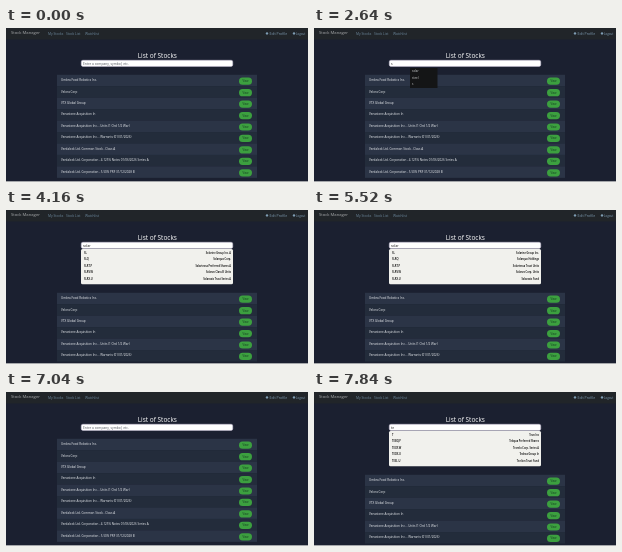
An HTML page that plays this animation: 302x154 px, repeating every 8 s.

```html
<!DOCTYPE html>
<html lang="en">
<head>
<meta charset="utf-8">
<title>List of stocks</title>
<style>
html, body { margin: 0; width: 100%; height: 100%; overflow: hidden; background: #1b2030; }
svg { display: block; width: 302px; height: 154px; }
text { font: 3.3px "Open Sans", sans-serif; white-space: pre; }
</style>
</head>
<body>
<svg id="stage" viewBox="0 0 302 154"></svg>
<script>
const stage = document.getElementById('stage');
const LOOP = 8000;

const stocks = [
  'Umbra Food Robotics Inc.', 'Velora Corp', 'VTX Global Group', 'Venastone Acquisition In',
  'Venastone Acquisition Inc. - Units (1 Ord 1/2 War)',
  'Venastone Acquisition Inc. - Warrants (01/01/2026)',
  'Verdalock Ltd. Common Stock - Class A',
  'Verdalock Ltd. Corporation - 4.125% Notes 01/06/2026 Series A',
  'Verdalock Ltd. Corporation - 5.50% PRF 31/12/2028 B'
];

const hints = ['solar', 'steel', 's', 'metals', 'tin', 'bank'];

// Each result is "symbol|company".
const results = {
  first: ['SLR|Solarine Holdings', 'SOLQ|Solquest Corp.', 'SOLT.P|Soltessa Preferred A', 'SOLV.W|Solvaro Warrants', 'SOLX.U|Solaxis Trust Units'],
  solar: ['SL|Solarine Group Inc. A', 'SLQ|Solarquo Corp.', 'SLRT.P|Solartessa Preferred Shares A', 'SLRV.W|Solarvo Class B Units', 'SLRX.U|Solaraxis Trust Series A'],
  more: ['SL|Solarine Group Inc.', 'SLRQ|Solarquo Holdings', 'SLRT.P|Solartessa Trust Units', 'SLRV.W|Solarvo Corp. Units', 'SLRX.U|Solaraxis Fund'],
  s: ['SABR.|Sabrel Group Inc. Uni', 'SCOR|Scorvane Corp. Uni', 'SDRL.|Sedrallo Grp. Units A', 'SELM|Selmora Trust A', 'SERQ.|Serqua Partners'],
  t: ['T|Tavo Inc.', 'TABQ|Tabqua Holdings Inc.', 'TACR|Tacrelo Corp.', 'TADX|Tadexa Group', 'TAEL|Taelion Trust A'],
  te: ['T|Tevo Inc', 'TEBQ.P|Tebqua Preferred Shares', 'TECR.W|Tecrelo Corp. Series A', 'TEDX.U|Tedexa Group In', 'TEEL.U|Teelion Trust Fund']
};

// Start time, typed text, number of hints, result set, hint opacity.
const states = [
  [0, '', 0],
  [720, '', 6, null, .6],
  [800, '', 6],
  [2640, 's', 3],
  [3280, 'so', 0],
  [3440, 'sol', 0],
  [3760, 'sola', 0],
  [3920, 'solar', 0, 'first'],
  [4160, 'solar', 0, 'solar'],
  [4320, 'solar', 0, 'more'],
  [4720, 'solar', 0, 'solar'],
  [5200, 'solar', 0, 'more'],
  [6000, 'sol', 0, 'more'],
  [6080, 'so', 0, 'more'],
  [6160, 's', 3, 'more'],
  [6320, 's', 3, 's'],
  [6560, '', 0],
  [7520, 't', 0, 't'],
  [7760, 'te', 0, 'te']
];

const rect = (x, y, w, h, fill, r = 0, extra = '') =>
  `<rect x="${x}" y="${y}" width="${w}" height="${h}" rx="${r}" fill="${fill}" ${extra}/>`;
const text = (x, y, s, fill, size = 3.3, anchor = 'start', weight = 400) =>
  `<text x="${x}" y="${y}" fill="${fill}" text-anchor="${anchor}" style="font-size:${size}px;font-weight:${weight}">${s}</text>`;

function header() {
  return rect(0, 0, 302, 11.5, '#212529') +
    text(5, 6.2, 'Stock Manager', '#a9abad', 4.2) +
    text(42, 6.5, 'My Stocks', '#6f8ba0') +
    text(60, 6.5, 'Stock List', '#6f8ba0') +
    text(79, 6.5, 'Watchlist', '#6f8ba0') +
    `<circle cx="261" cy="5.4" r="1.2" fill="#7f9db3"/>` +
    text(263.5, 6.5, 'Edit Profile', '#7f9db3', 3.5) +
    `<circle cx="288" cy="5.4" r="1.2" fill="#7f9db3"/>` +
    text(290, 6.5, 'Logout', '#7f9db3', 2.9) +
    text(151.3, 29.5, 'List of Stocks', '#fff', 6.5, 'middle');
}

function stockList(top) {
  return stocks.map((name, i) => {
    const y = top + i * 11.45;
    if (y > 150) return '';
    return rect(51, y, 200, 11.45, i % 2 ? '#232c3b' : '#2b3446') +
      text(55, y + 6.3, name, '#f2f4f7', 3) +
      rect(233, y + 2.8, 13, 7.2, '#3ca03f', 3.6) +
      text(239.5, y + 7.4, 'View', '#173f25', 2.8, 'middle');
  }).join('');
}

function resultPanel(rows) {
  return rect(75, 39, 152, 35.2, '#f1f1ed', 1.5) + rows.map((row, i) => {
    const [symbol, name] = row.split('|'), y = 43.5 + i * 6.5;
    return text(78, y, symbol, '#000', 2.6, 'start', 600) + text(225, y, name, '#000', 2.5, 'end', 600);
  }).join('');
}

function hintMenu(count, opacity) {
  return `<g opacity="${opacity}">` + rect(96, 40, 27.5, count * 6.2 + 1.3, '#141516', .5) +
    hints.slice(0, count).map((h, i) => text(98, 44.4 + i * 6.2, h, '#d0d2d4', 2.9)).join('') + '</g>';
}

function draw([, typed, count, set, opacity = 1]) {
  stage.innerHTML = header() + stockList(set ? 82.8 : 46.8) +
    (set ? resultPanel(results[set]) : '') +
    rect(75.25, 32.25, 151.5, 6.2, '#fff', 1.6, 'stroke="#c4bcd4" stroke-width=".5"') +
    text(77, 36.5, typed || 'Enter a company, symbol, etc.', typed ? '#111' : '#50545c') +
    (count ? hintMenu(count, opacity) : '') +
    rect(0, 153, 302, 1, '#a5a7aa');
}

let shown;
function tick() {
  const t = performance.now() % LOOP;
  const state = states.findLast(s => s[0] <= t);
  if (state !== shown) draw(shown = state);
  requestAnimationFrame(tick);
}
tick();
</script>
</body>
</html>
```
